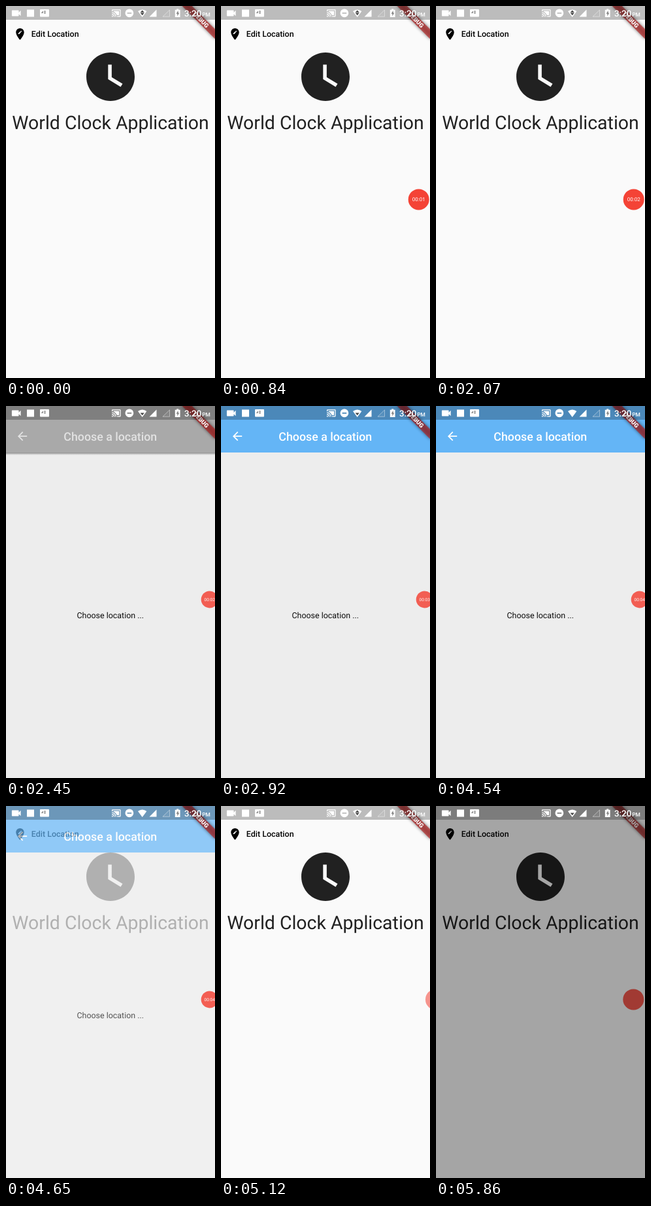
An HTML page that plays this animation: 320 by 568 pixels, repeating every 6310 ms.

```html
<!DOCTYPE html>
<html lang="en">
<head>
<meta charset="utf-8">
<title>World Clock</title>
<style>
  html, body { margin: 0; width: 100%; height: 100%; overflow: hidden; background: #fafafa; }
  svg { display: block; width: 320px; height: 568px; font-family: Roboto, "Noto Sans", sans-serif; }
  .medium { font-weight: 500; }
  .mid { text-anchor: middle; }
</style>
</head>
<body>
<svg viewBox="0 0 320 568" text-rendering="geometricPrecision">
  <defs>
    <filter id="soft" x="-30%" y="-150%" width="160%" height="400%"><feGaussianBlur stdDeviation="3"/></filter>
    <linearGradient id="fade" x2="0" y2="1">
      <stop stop-opacity=".4"/>
      <stop offset="1" stop-opacity="0"/>
    </linearGradient>
  </defs>

  <g id="home">
    <rect width="320" height="568" fill="#fafafa"/>
    <path transform="translate(10.8 32.3) scale(.889)" d="M12 2C8.14 2 5 5.14 5 9c0 5.25 7 13 7 13s7-7.75 7-13c0-3.86-3.14-7-7-7zm-1.56 10H9v-1.44l3.35-3.34 1.43 1.43L10.44 12zm4.45-4.45l-.7.7-1.44-1.44.7-.7c.15-.15.39-.15.54 0l.9.9c.15.15.15.39 0 .54z"/>
    <text class="medium" x="38.8" y="47" font-size="12.44">Edit Location</text>
    <path fill="#212121" transform="translate(115.6 63.6) scale(3.7)" d="M12 2C6.5 2 2 6.5 2 12s4.5 10 10 10 10-4.5 10-10S17.5 2 12 2zm4.2 14.2L11 13V7h1.5v5.2l4.5 2.7-.8 1.3z"/>
    <text class="mid" x="160" y="188" font-size="28.44" fill="#212121">World Clock Application</text>
  </g>

  <g id="chooser">
    <rect width="320" height="568" fill="#ededed"/>
    <rect id="barShadow" y="71" width="320" height="4" fill="url(#fade)"/>
    <rect id="bar" width="320" height="71"/>
    <g id="barText">
      <path transform="translate(14.4 35.5) scale(.889)" d="M20 11H7.83l5.59-5.59L12 4l-8 8 8 8 1.41-1.41L7.83 13H20v-2z"/>
      <text class="mid medium" x="159.8" y="53" font-size="17.78">Choose a location</text>
    </g>
    <text class="mid" x="159.8" y="324" font-size="12.44" fill="#0c0c0c">Choose location ...</text>
  </g>

  <g transform="translate(320 0) rotate(45) scale(.889)">
    <rect x="-40" y="28" width="80" height="12" opacity=".5" filter="url(#soft)"/>
    <rect x="-40" y="28" width="80" height="12" fill="#b71c1c" fill-opacity=".63"/>
    <text class="mid" y="37.4" font-size="10.2" font-weight="900" fill="#fff">DEBUG</text>
  </g>
  <rect width="320" height="21" opacity=".25"/>

  <g id="bubble">
    <circle r="16" fill="#f44336"/>
    <text id="timer" class="mid" y="2.9" font-size="8" fill="#fff"></text>
  </g>
  <rect id="shade" width="320" height="568" opacity=".34"/>

  <g fill="#fff">
    <path transform="translate(6.6 1.9) scale(.76)" d="M17 10.5V7c0-.55-.45-1-1-1H4c-.55 0-1 .45-1 1v10c0 .55.45 1 1 1h12c.55 0 1-.45 1-1v-3.5l4 4v-11l-4 4z"/>
    <rect x="32" y="5.5" width="11" height="11"/>
    <rect x="52" y="5" width="14" height="11.5" rx="1"/>
    <path d="M53.5 11 57 7V11ZM58.5 7H60.5V12H58.5Z" fill="#000" opacity=".4"/>
    <path transform="translate(161.4 3.4) scale(.62)" d="M1 18v3h3c0-1.66-1.34-3-3-3zm0-4v2c2.76 0 5 2.24 5 5h2c0-3.87-3.13-7-7-7zm18-7H5v1.63c3.96 1.28 7.09 4.41 8.37 8.37H19V7zM1 10v2c4.97 0 9 4.03 9 9h2c0-6.08-4.93-11-11-11zM21 3H3c-1.1 0-2 .9-2 2v3h2V5h18v14h-7v2h7c1.1 0 2-.9 2-2V5c0-1.1-.9-2-2-2z"/>
    <path fill-rule="evenodd" d="M182.5 10.8a6.4 6.4 0 1 0 12.8 0a6.4 6.4 0 1 0-12.8 0ZM185.6 9.9H192.2V11.7H185.6Z"/>
    <path d="M202 8Q208.7 2.8 215.4 8L208.7 17Z"/>
    <path id="up" d="M205.6 9.8 208.7 6.4 211.8 9.8Z" fill="#444"/>
    <path id="down" d="M205.6 10.6H211.8L208.7 14.2Z" fill="#444"/>
    <path d="M230.5 5.5V16.5H219.5Z"/>
    <path d="M250.5 6V16.2H240Z" fill-opacity=".06" stroke="#fff" stroke-opacity=".55" stroke-width=".8"/>
    <path d="M261.2 4.5H264.2V5.7H266.6V17H258.8V5.7H261.2Z"/>
    <path d="M263.6 7 260.6 11.8H262.4V15.4L265.2 10.6H263.6Z" fill="#000" opacity=".5"/>
    <text class="medium" x="273" y="16" font-size="13.3">3:20</text>
    <text class="medium" x="300.2" y="16" font-size="8.4">PM</text>
  </g>
</svg>

<script>
const LOOP = 6310;
const FULL = 16, SMALL = 13;

// time, chooser opacity, bubble x, bubble radius, bubble opacity
const STEPS = [
  [0,    0,   340, FULL, 0],
  [100,  0,   322, FULL, .6],
  [215,  0,   310, FULL, .85],
  [330,  0,   302.7, FULL, 1],
  [2250, .3,  302.7, FULL, 1],
  [2350, .7,  308, 14.5, .92],
  [2450, 1,   311.7, SMALL, .84],
  [4650, .7,  311.7, SMALL, .84],
  [4750, .3,  311.7, SMALL, .84],
  [4860, 0,   311.7, SMALL, .84],
  [5010, 0,   320, 14.5, .7],
  [5120, 0,   329, FULL, .55],
  [5860, 0,   302.3, FULL, .88]
];
const TICKS = [840, 1820, 2770, 3760, 4750];

const $ = id => document.getElementById(id);
const show = (id, on) => { $(id).style.display = on ? "" : "none"; };
const within = (t, a, b) => t >= a && t < b;

function draw(t) {
  const [, page, x, r, alpha] = STEPS.filter(s => s[0] <= t).pop();
  const grey = t < 2920;

  $("chooser").setAttribute("opacity", page);
  $("bar").setAttribute("fill", grey ? "#a9a9a9" : "#64b5f6");
  $("barText").setAttribute("fill", grey ? "#e2e2e2" : "#fff");
  show("barShadow", grey);

  $("bubble").setAttribute("transform", `translate(${x} 295.4) scale(${r / FULL})`);
  $("bubble").setAttribute("opacity", alpha);
  $("timer").textContent = "00:0" + TICKS.filter(k => k <= t).length;
  show("timer", t < 5120);

  show("shade", t >= 5860);
  show("up", !within(t, 2250, 5010) && t < 5860);
  show("down", !within(t, 3760, 5010));
}

const start = performance.now();
function tick() {
  draw((performance.now() - start) % LOOP);
  requestAnimationFrame(tick);
}
tick();
</script>
</body>
</html>
```
